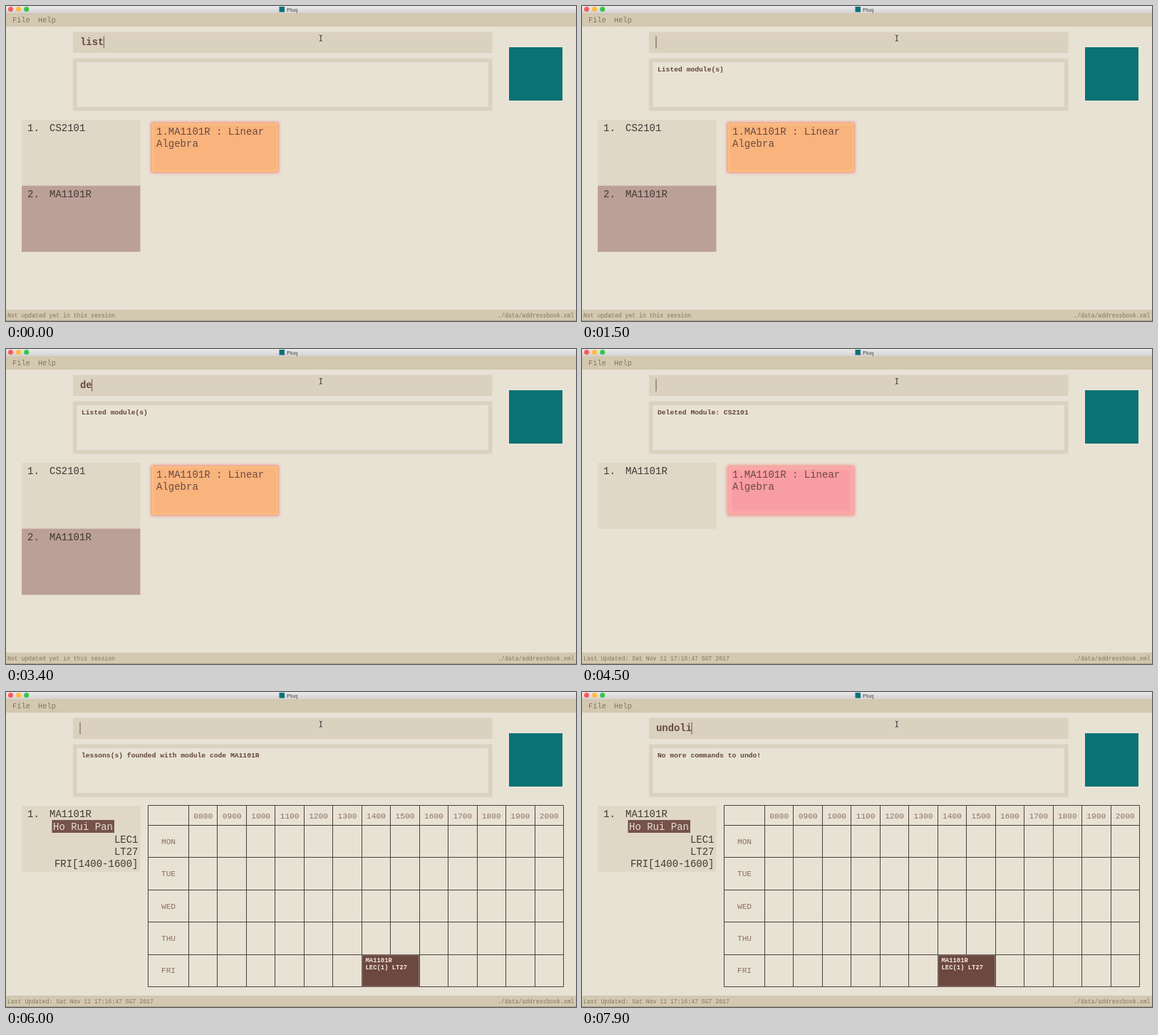
Animation of 800x443 px, one loop 8000 ms. Source, as an HTML page:

```html
<!DOCTYPE html>
<html lang="en">
<head>
<meta charset="utf-8">
<title>Module planner</title>
<style>
  html, body { margin: 0; width: 100%; height: 100%; overflow: hidden; background: #e8e2d5; }
  svg { display: block; width: 100%; height: 100%; }
  text { font-family: "Liberation Mono", "Courier New", monospace; white-space: pre; }
  .menu { font-size: 10.4px; fill: #83765f; }
  .foot { font-size: 8.15px; fill: #83765f; }
  .input { font-size: 13.9px; font-weight: bold; fill: #674a40; }
  .result { font-size: 9.68px; font-weight: bold; fill: #62443a; }
  .item { font-size: 14px; fill: #403a34; }
  .card { font-size: 14px; fill: #6b4a3f; }
  .head { font-size: 11.2px; fill: #8d7064; text-anchor: middle; }
  .slot { font-size: 8.9px; font-weight: bold; fill: #f4ece4; }
  .right { text-anchor: end; }
</style>
</head>
<body>
<svg viewBox="0 0 800 443" preserveAspectRatio="none">
  <defs>
    <linearGradient id="bar" x2="0" y2="1">
      <stop stop-color="#ebe9eb"/><stop offset="1" stop-color="#d4d2d4"/>
    </linearGradient>
    <filter id="soft" x="-10%" y="-20%" width="120%" height="140%"><feGaussianBlur stdDeviation="2"/></filter>
    <filter id="edge" x="-10%" y="-20%" width="120%" height="140%"><feGaussianBlur stdDeviation="1.2"/></filter>
  </defs>

  <rect width="800" height="443" fill="#e8e2d5"/>
  <rect y="10" width="800" height="19" fill="#d3c8b0"/>
  <rect width="800" height="10" fill="url(#bar)"/>
  <circle cx="6.5" cy="4.6" r="3.5" fill="#fc5b57"/>
  <circle cx="17.6" cy="4.6" r="3.5" fill="#fdbb3e"/>
  <circle cx="28.7" cy="4.6" r="3.5" fill="#34c648"/>
  <rect x="383.5" y="1" width="7.5" height="7.5" fill="#0b7275"/>
  <text x="394" y="7.5" style="font: 7.6px 'Liberation Sans', Arial, sans-serif" fill="#444">Pluq</text>
  <text class="menu" x="9" y="23">File</text>
  <text class="menu" x="45" y="23">Help</text>

  <rect x="94" y="36.5" width="588.5" height="29.5" fill="#dbd1bf"/>
  <text class="input" id="input" x="104" y="55.3"></text>
  <rect id="caret" x="103.5" y="42.5" width="1" height="17" fill="#6b5148"/>
  <path d="M439.8 41.2q2 0 2 1.2q0-1.2 2-1.2M441.8 42v6.5M439.8 49.3q2 0 2-1.2q0 1.2 2 1.2" fill="none" stroke="#222" stroke-width=".9"/>

  <rect x="94" y="73.5" width="588.5" height="74" fill="#dbd1bf"/>
  <rect x="99.5" y="79" width="577.5" height="63" fill="#e8e2d5"/>
  <text class="result" id="result" x="106" y="91.5"></text>
  <rect x="706" y="58" width="75" height="75" fill="#0b7275"/>

  <rect x="22" y="160" width="166.5" height="93" fill="#e0d7c7"/>
  <text class="item" x="30" y="175.8">1.</text>
  <text class="item" id="first" x="61" y="175.8"></text>
  <g id="second">
    <rect x="22" y="252.7" width="166.5" height="93" fill="#bba097"/>
    <text class="item" x="30" y="268.8">2.</text>
    <text class="item" x="61" y="268.8">MA1101R</text>
  </g>

  <g id="cards">
    <g id="orange">
      <rect x="203.5" y="163.5" width="179.5" height="71" fill="#f4877c" filter="url(#soft)"/>
      <rect x="205" y="165" width="176.5" height="68" fill="#fcc47b"/>
      <rect x="206.5" y="166.5" width="173.5" height="65" fill="#f9b47d" filter="url(#edge)"/>
    </g>
    <g id="pink">
      <rect x="203.5" y="163.5" width="179.5" height="71" rx="2" fill="#f58f88" filter="url(#soft)"/>
      <rect x="205.5" y="165.5" width="175.5" height="67" rx="1" fill="#fab0ac" filter="url(#edge)"/>
      <rect x="209" y="169" width="168.5" height="60" fill="#f99da5" filter="url(#soft)"/>
    </g>
    <text class="card" x="211" y="180.5">1.MA1101R : Linear</text>
    <text class="card" x="211" y="198">Algebra</text>
  </g>

  <g id="lessons">
    <rect x="64.5" y="180" width="87.5" height="18" fill="#75534a"/>
    <text class="item" x="66" y="193.8" style="fill:#eadfd5">Ho Rui Pan</text>
    <text class="item right" x="185.5" y="212">LEC1</text>
    <text class="item right" x="185.5" y="229">LT27</text>
    <text class="item right" x="185.5" y="246">FRI[1400-1600]</text>
    <path id="grid" fill="none" stroke="#4a423b" stroke-width="1"/>
    <g id="labels"></g>
    <rect x="500" y="370" width="79.5" height="44" fill="#6d483f" stroke="#8f8078"/>
    <text class="slot" x="504.5" y="380">MA1101R</text>
    <text class="slot" x="504.5" y="390">LEC(1) LT27</text>
  </g>

  <rect y="427" width="800" height="16" fill="#d3c8b0"/>
  <rect y="442" width="800" height="1" fill="#aaa08c"/>
  <text class="foot" id="status" x="2" y="437.7"></text>
  <text class="foot right" x="797.5" y="437.7">./data/addressbook.xml</text>
</svg>

<script>
const LOOP = 8000, CHAR = 8.34;
const $ = id => document.getElementById(id);
const show = (id, on) => $(id).setAttribute('display', on ? 'inline' : 'none');

// Timetable: a label column and row, then 13 hours by 5 days
const left = 199.5, colStart = 256.5, colStep = 40.46;
const head = 159.5, rowStart = 187.5, rowStep = 45.4;
const right = colStart + 13 * colStep, bottom = rowStart + 5 * rowStep;
const snap = v => Math.floor(v) + 0.5;
const vLine = x => `M${snap(x)} ${head}V${snap(bottom)}`;
const hLine = y => `M${left} ${snap(y)}H${snap(right)}`;

function label(text, x, y) {
  const el = document.createElementNS('http://www.w3.org/2000/svg', 'text');
  el.setAttribute('class', 'head');
  el.setAttribute('x', x);
  el.setAttribute('y', y);
  el.textContent = text;
  $('labels').append(el);
}

let path = vLine(left) + hLine(head);
for (let i = 0; i <= 13; i++) {
  path += vLine(colStart + i * colStep);
  if (i < 13) label(String(800 + i * 100).padStart(4, '0'), colStart + (i + .5) * colStep, 177.7);
}
for (let i = 0; i <= 5; i++) path += hLine(rowStart + i * rowStep);
['MON', 'TUE', 'WED', 'THU', 'FRI'].forEach((d, i) => label(d, 228, rowStart + (i + .5) * rowStep + 3.6));
$('grid').setAttribute('d', path);

// Each step changes part of the state from its time on
const steps = [[0, { input: 'list', result: '', page: 'all' }]];
const run = (at, change) => steps.push([at, change]);
function type(start, text, prefix = '') {
  for (let i = 1; i <= text.length; i++)
    run(start + (i - 1) * 100, { input: prefix + text.slice(0, i) });
}

run(700, { input: '', result: 'Listed module(s)' });
type(3300, 'delete 1');
run(4300, { input: '', result: 'Deleted Module: CS2101', page: 'deleted' });
type(4800, 'view 1');
run(5700, { input: '', result: 'lessons(s) founded with module code MA1101R', page: 'view' });
type(6300, 'undo');
run(7100, { result: 'No more commands to undo!' });
type(7700, 'li', 'undo');

function render({ input, result, page }) {
  const all = page === 'all', view = page === 'view';
  $('input').textContent = input;
  $('caret').setAttribute('x', 103.5 + input.length * CHAR);
  $('result').textContent = result;
  $('first').textContent = all ? 'CS2101' : 'MA1101R';
  $('status').textContent = all ? 'Not updated yet in this session'
    : 'Last Updated: Sat Nov 11 17:16:47 SGT 2017';
  show('second', all);
  show('cards', !view);
  show('orange', all);
  show('pink', page === 'deleted');
  show('lessons', view);
}

let shown = -1;
const begin = performance.now();
function tick() {
  const t = (performance.now() - begin) % LOOP;
  const past = steps.filter(([at]) => at <= t);
  if (past.length !== shown) {
    shown = past.length;
    render(Object.assign({}, ...past.map(s => s[1])));
  }
  requestAnimationFrame(tick);
}
tick();
</script>
</body>
</html>
```
